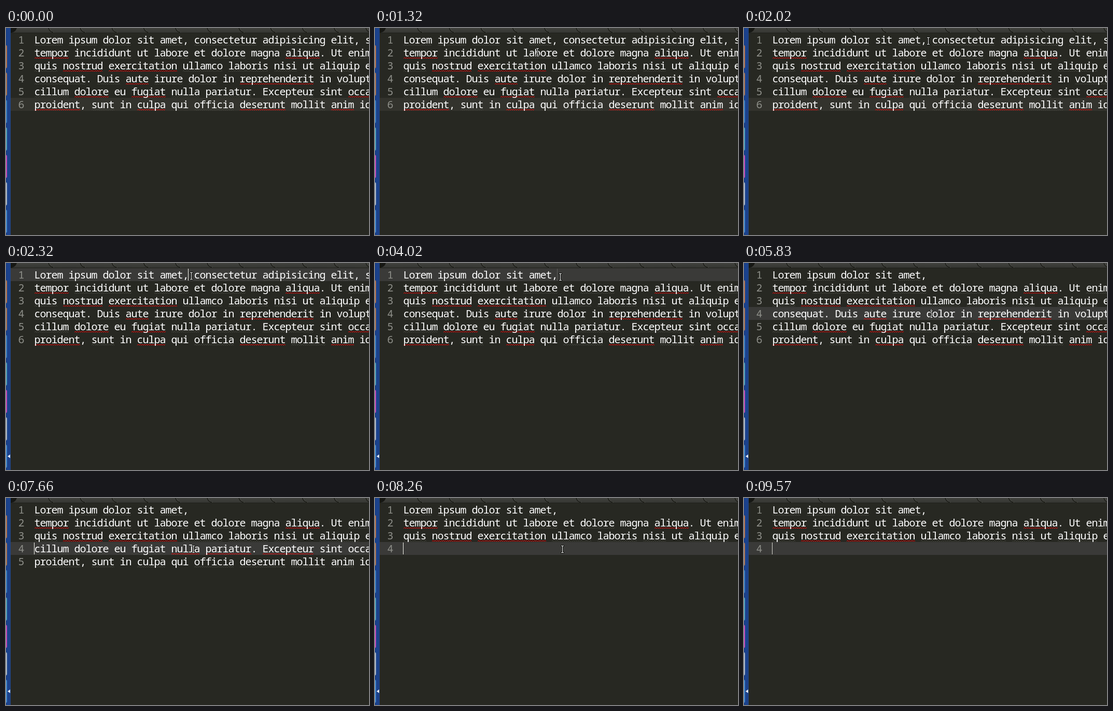
These frames come from a looping animation (700x400 px, 9670 ms). An HTML page with a canvas:

```html
<!DOCTYPE html>
<html lang="en">
<head>
<meta charset="utf-8">
<title>Editor</title>
<style>
html, body { margin: 0; width: 100%; height: 100%; overflow: hidden; background: #272822; }
canvas { display: block; width: 700px; height: 400px; }
</style>
</head>
<body>
<canvas id="stage" width="700" height="400"></canvas>
<script>
const ctx = document.getElementById('stage').getContext('2d');
const LOOP = 9670, LEFT = 55, TOP = 10, ROW = 25, CHAR = 11;
const FONT = '500 20px "Noto Sans Mono", "DejaVu Sans Mono", monospace';

const line = (text, red = '') => ({ text, red: red.split(' ') });
const first = line('Lorem ipsum dolor sit amet, consectetur adipisicing elit, sed do');
const firstCut = line('Lorem ipsum dolor sit amet,');
const second = line('tempor incididunt ut labore et dolore magna aliqua. Ut enim ad', 'tempor aliqua');
const third = line('quis nostrud exercitation ullamco laboris nisi ut aliquip ex ea', 'nostrud exercitation');
const fourth = line('consequat. Duis aute irure dolor in reprehenderit in voluptate', 'aute reprehenderit');
const fourthCut = line('consequat. Duis aute irure d', 'aute');
const fifth = line('cillum dolore eu fugiat nulla pariatur. Excepteur sint occaecat', 'dolore fugiat occaecat');
const fifthUp = line(fifth.text, 'nulla pariatur Excepteur');
const sixth = line('proident, sunt in culpa qui officia deserunt mollit anim id est', 'proident culpa deserunt anim');
const sixthUp = line(sixth.text);

// at: edit time, blink: start of the caret's blink cycle
const states = [
  { at: 0, row: 5, col: -1, lines: [first, second, third, fourth, fifth, sixth] },
  { at: 2240, blink: 2350, row: 0, col: 27, lines: [first, second, third, fourth, fifth, sixth] },
  { at: 3480, blink: 3480, row: 0, col: 27, lines: [firstCut, second, third, fourth, fifth, sixth] },
  { at: 4960, blink: 5170, row: 3, col: 28, lines: [firstCut, second, third, fourth, fifth, sixth] },
  { at: 6250, blink: 6250, row: 3, col: 28, lines: [firstCut, second, third, fourthCut, fifth, sixth] },
  { at: 7440, blink: 7660, row: 3, col: 0, lines: [firstCut, second, third, fifthUp, sixthUp] },
  { at: 7890, blink: 7950, row: 3, col: 0, lines: [firstCut, second, third, sixthUp] },
  { at: 8220, blink: 8255, row: 3, col: 0, lines: [firstCut, second, third, line('')] }
];

// Pointer keys: time, x, y
const pointer = [
  [540, 511, 394], [700, 478, 330], [900, 410, 205], [1120, 338, 90], [1320, 313, 46],
  [1500, 319, 32], [1760, 342, 27], [2120, 357, 25], [3980, 357, 25], [4060, 358, 30],
  [4300, 364, 105], [4480, 365, 155], [4640, 364, 140], [4880, 361, 99],
  [9240, 361, 99], [9340, 358, 190], [9440, 350, 320], [9520, 344, 387]
];

const icons = [[33, '#b9784f'], [86, '#b07a55'], [139, '#3f83c4'], [192, '#55a6bd'],
  [245, '#c94fbd'], [298, '#aebac8'], [351, '#4a8fd0']];

function rect(color, x, y, w, h) {
  ctx.fillStyle = color;
  ctx.fillRect(x, y, w, h);
}

function drawTabs() {
  const shade = ctx.createLinearGradient(0, 0, 0, 9);
  shade.addColorStop(0, '#41423e');
  shade.addColorStop(1, '#353632');
  rect(shade, 9, 0, 691, 9);
  ctx.fillStyle = '#161713';
  ctx.beginPath();
  ctx.moveTo(9, 0);
  ctx.lineTo(21, 0);
  ctx.quadraticCurveTo(18, 8, 11, 9);
  ctx.lineTo(9, 9);
  ctx.fill();
  for (let i = 0; i < 11; i++) {
    const x = 87 + i * 61.2;
    for (const [dx, color] of [[1.5, '#4b4c47'], [0, '#181914']]) {
      ctx.strokeStyle = color;
      ctx.lineWidth = 1.3;
      ctx.beginPath();
      ctx.moveTo(x - 5 + dx, 0);
      ctx.quadraticCurveTo(x - 3 + dx, 7, x + 4 + dx, 8.5);
      ctx.stroke();
    }
  }
  rect('#20211c', 9, 9, 691, 1);
}

function drawDock(focused) {
  const blue = ctx.createLinearGradient(0, 0, 9, 0);
  blue.addColorStop(0, '#183f88');
  blue.addColorStop(0.7, '#1c438f');
  blue.addColorStop(1, '#17346e');
  rect(blue, 0, 0, 9, 400);
  rect('#244a8c', 8, 0, 1, 400);
  for (const [y, color] of icons) {
    ctx.fillStyle = color;
    ctx.beginPath();
    ctx.roundRect(-10, y, 12, 45, 3);
    ctx.fill();
  }
  if (!focused) return;
  ctx.fillStyle = '#e4e8f0';
  ctx.beginPath();
  ctx.moveTo(3, 373.5);
  ctx.lineTo(8, 370);
  ctx.lineTo(8, 377);
  ctx.fill();
}

function squiggle(x, y, w, color) {
  ctx.strokeStyle = color;
  ctx.lineWidth = 1;
  ctx.beginPath();
  for (let d = 0; d <= w; d += 2) ctx.lineTo(x + d, y + (d % 4 ? 0 : 2));
  ctx.stroke();
}

function drawLine({ text, red }, row) {
  const y = TOP + row * ROW;
  ctx.font = FONT;
  ctx.letterSpacing = '-1px';
  ctx.fillStyle = '#8f908a';
  ctx.fillText(row + 1, 23.5, y + 20);
  for (const { 0: word, index } of text.matchAll(/[a-z]+/gi)) {
    if (word.length < 4 || /^(magna|sint)$/.test(word)) continue;
    const isRed = red.includes(word);
    squiggle(LEFT + index * CHAR, y + 22, word.length * CHAR, isRed ? '#f00808' : '#44453e');
  }
  ctx.fillStyle = '#ffffff';
  ctx.fillText(text, LEFT - 0.5, y + 20);
}

function caretAlpha(age) {
  if (age < 270) return 1;
  if (age < 450) return 0.9;
  if (age < 660) return 0.6 * (1 - (age - 450) / 210) ** 2;
  return Math.min(1, Math.max(0, (age - 1150) / 200));
}

function pointerAt(t) {
  const last = pointer.length - 1;
  if (t < pointer[0][0] || t > pointer[last][0]) return null;
  const i = Math.min(last - 1, pointer.findLastIndex(k => k[0] <= t));
  const a = pointer[i], b = pointer[i + 1];
  const span = b[0] - a[0], u = (t - a[0]) / span;
  const slope = (n, axis) => {
    const p = pointer[n - 1], q = pointer[n], r = pointer[n + 1];
    if (!p || !r) return 0;
    const before = (q[axis] - p[axis]) / (q[0] - p[0]);
    const after = (r[axis] - q[axis]) / (r[0] - q[0]);
    return before * after > 0 ? 2 * before * after / (before + after) : 0;
  };
  return [1, 2].map(axis => {
    const s = u * u * (3 - 2 * u);
    return a[axis] + (b[axis] - a[axis]) * s
      + span * (slope(i, axis) * u * (1 - u) ** 2 - slope(i + 1, axis) * u * u * (1 - u));
  });
}

function drawPointer(x, y) {
  x = Math.round(x);
  y = Math.round(y);
  rect('#11120f', x - 3, y - 8, 7, 3);
  rect('#11120f', x - 3, y + 5, 7, 3);
  rect('#11120f', x - 1, y - 6, 3, 12);
  rect('#ffffff', x - 2, y - 7, 5, 1);
  rect('#ffffff', x - 2, y + 6, 5, 1);
  rect('#ffffff', x, y - 7, 1, 14);
}

function draw(t) {
  const state = states.findLast(s => s.at <= t);
  const focused = state.col >= 0;
  const y = TOP + state.row * ROW;
  rect('#272822', 0, 0, 700, 400);
  rect(focused ? '#3a3a38' : '#33332d', 9, y, 691, ROW);
  drawTabs();
  drawDock(focused);
  state.lines.forEach(drawLine);
  if (focused) {
    ctx.globalAlpha = caretAlpha(t - state.blink);
    rect('#f8f8f0', LEFT - 1 + state.col * CHAR, y + 1, 1, 23);
    ctx.globalAlpha = 1;
  }
  const p = pointerAt(t);
  if (p) drawPointer(...p);
}

const start = performance.now();
function tick() {
  draw((performance.now() - start) % LOOP);
  requestAnimationFrame(tick);
}
tick();
</script>
</body>
</html>
```
